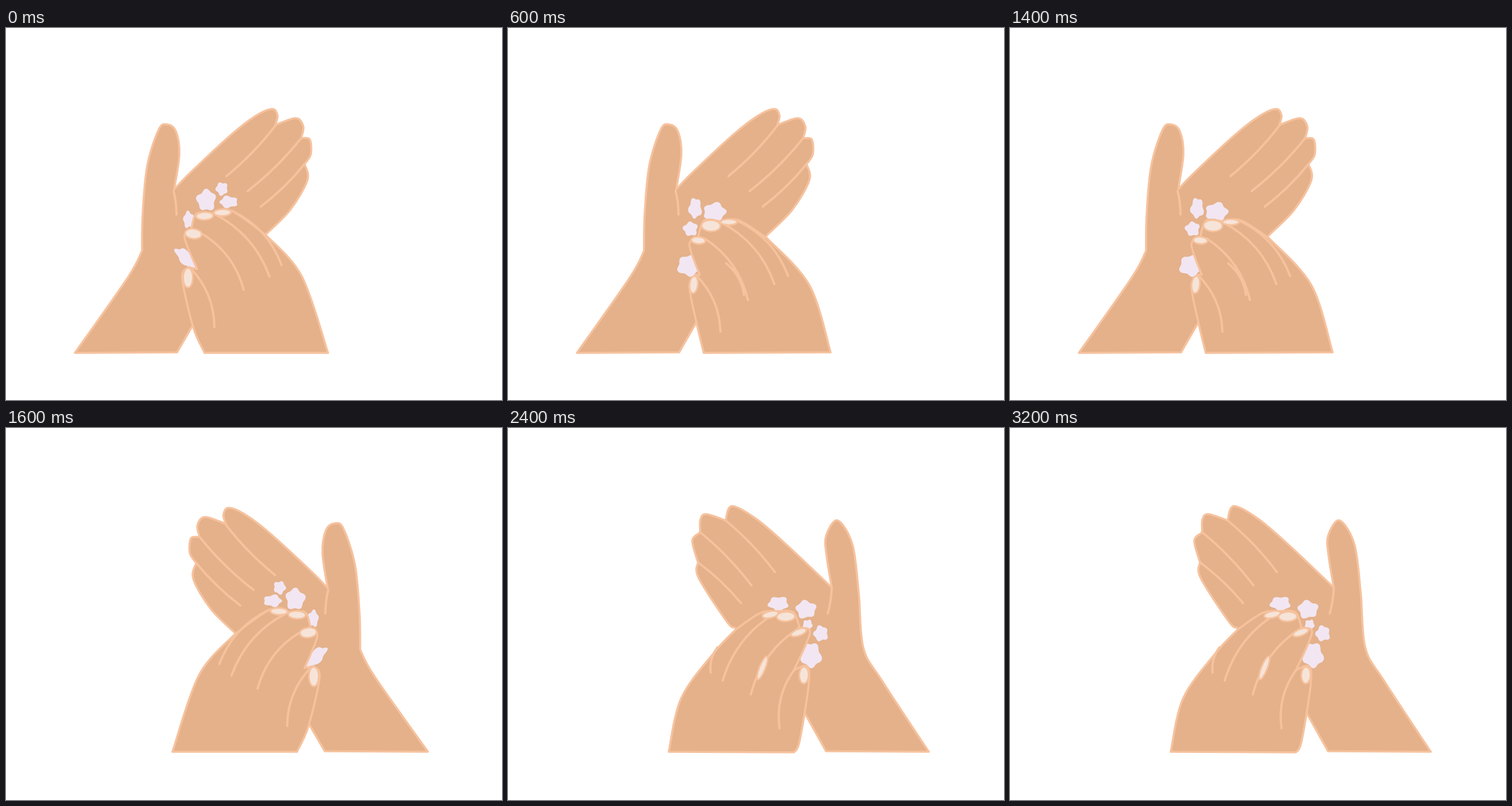
Recreate the animation shown at these times as an HTML page with a canvas. Size 864 by 648 pixels, loop 3.4 s.

```html
<!DOCTYPE html>
<html lang="en">
<head>
<meta charset="utf-8">
<title>Washing hands</title>
<style>
html, body { margin: 0; width: 100%; height: 100%; overflow: hidden; background: #fff; }
canvas { display: block; }
</style>
</head>
<body>
<canvas id="stage" width="864" height="648"></canvas>
<script>
const ctx = document.getElementById("stage").getContext("2d");
const SKIN = "#e4b18a", EDGE = "#f6c29e", NAIL = "#f6e4d9", FOAM = "#f2e6f2";
const STEP = 200;

const points = text => text.trim().split(/\s+/).map(p => p.split(",").map(Number));

// Closed outline through points; "/" marks a sharp corner.
function outline(text) {
  let last = null;
  ctx.beginPath();
  for (const run of text.split("/")) {
    const pts = points(run);
    if (last) pts.unshift(last);
    else ctx.moveTo(...pts[0]);
    const at = i => pts[Math.max(0, Math.min(pts.length - 1, i))];
    for (let i = 0; i < pts.length - 1; i++) {
      const [a, b, c, d] = [at(i - 1), at(i), at(i + 1), at(i + 2)];
      ctx.bezierCurveTo(
        b[0] + (c[0] - a[0]) / 6, b[1] + (c[1] - a[1]) / 6,
        c[0] - (d[0] - b[0]) / 6, c[1] - (d[1] - b[1]) / 6, ...c);
    }
    last = pts[pts.length - 1];
  }
  ctx.closePath();
}

function skin(text) {
  outline(text);
  ctx.fillStyle = SKIN;
  ctx.fill();
  ctx.lineWidth = 3.6;
  ctx.stroke();
}

// Finger lines, each from one point to the next, bowed sideways.
function rays(bend, text) {
  const pts = points(text);
  ctx.lineWidth = 4;
  ctx.beginPath();
  for (let i = 0; i < pts.length; i += 2) {
    const [[x, y], [u, v]] = [pts[i], pts[i + 1]];
    const k = 2 * bend;
    ctx.moveTo(x, y);
    ctx.quadraticCurveTo((x + u) / 2 + k * (v - y), (y + v) / 2 - k * (u - x), u, v);
  }
  ctx.stroke();
}

function nail(x, y, u, v, ratio = 0.3) {
  const len = Math.hypot(u - x, v - y);
  ctx.beginPath();
  ctx.ellipse((x + u) / 2, (y + v) / 2, len / 2, len * ratio, Math.atan2(v - y, u - x), 0, 2 * Math.PI);
  ctx.fillStyle = NAIL;
  ctx.fill();
  ctx.lineWidth = 2.8;
  ctx.stroke();
}

function foam(x, y, rx, ry, turn = 0) {
  ctx.beginPath();
  for (let a = 0; a < 2 * Math.PI; a += 0.1) {
    const r = 1 + 0.12 * Math.sin(5 * a + x) + 0.04 * Math.sin(3 * a + y);
    const px = rx * r * Math.cos(a), py = ry * r * Math.sin(a);
    ctx.lineTo(x + px * Math.cos(turn) - py * Math.sin(turn), y + px * Math.sin(turn) + py * Math.cos(turn));
  }
  ctx.fillStyle = FOAM;
  ctx.fill();
}

function leftPalm() {
  skin("120,566 212,435 237,388 / 238,325 246,240 266,177 281,168 296,180 302,220 293,281 / 320,253 392,186 435,153 464,141 473,153 469,169 / 505,157 518,172 514,192 / 529,194 531,220 520,237 / 525,265 495,317 452,360 / 343,487 / 298,565 / 120,566");
  rays(0.03, "292,284 297,325 470,169 384,258 514,192 421,284 520,237 444,311");
}

function rightPalm() {
  skin("736,566 655,443 622,385 614,290 603,205 577,163 557,190 558,225 567,280 / 490,207 435,160 393,138 382,163 / 348,152 338,162 338,184 / 324,198 334,236 / 335,263 384,339 398,350 / 514,488 / 557,565 / 736,566");
  rays(0.03, "567,280 560,325 382,163 468,253 337,183 427,276 334,236 409,307");
}

function rest() {
  leftPalm();
  foam(349, 300, 16, 18);
  foam(376, 280, 10, 11);
  foam(388, 303, 15, 10);
  foam(318, 334, 9, 14);
  foam(314, 401, 23, 11, 0.75);
  skin("346,566 / 326,521 307,436 318,417 / 333,420 / 311,365 323,349 / 332,323 361,323 / 392,318 452,360 / 515,432 561,566 / 346,566");
  rays(0.1, "320,417 363,521 341,358 414,456 361,323 459,433 395,319 480,413");
  nail(317, 418, 317, 452, 0.25);
  nail(312, 357, 341, 360);
  nail(331, 328, 361, 327, 0.23);
  nail(362, 322, 392, 321, 0.2);
}

function up() {
  leftPalm();
  foam(317, 290, 9, 12);
  foam(364, 280, 7, 6);
  foam(311, 383, 11, 13);
  skin("370,564 / 330,514 / 314,428 322,391 / 301,315 324,299 / 336,279 357,281 / 390,281 403,292 / 432,298 470,346 / 530,458 560,565 / 370,564");
  rays(0.05, "322,391 360,491 328,302 400,416 357,282 439,403 403,292 470,391");
  nail(320, 392, 319, 430, 0.2);
  nail(303, 305, 328, 319, 0.4);
  nail(329, 288, 356, 288, 0.42);
  nail(372, 284, 402, 293, 0.25);
  nail(411, 294, 433, 306, 0.22);
}

function out() {
  leftPalm();
  foam(342, 290, 13, 13);
  foam(373, 285, 18, 14);
  foam(337, 314, 7, 5);
  foam(318, 337, 12, 14);
  foam(320, 384, 14, 22);
  skin("378,565 / 348,522 330,430 343,400 / 350,402 / 329,350 345,334 / 358,308 382,309 / 412,305 471,346 / 540,425 584,563 / 378,565");
  rays(0.1, "343,400 379,505 357,342 429,445 384,311 479,422 412,306 500,402 395,380 425,437");
  nail(338, 400, 337, 434, 0.18);
  nail(333, 340, 358, 341);
  nail(349, 316, 386, 314, 0.25);
  nail(380, 308, 413, 308, 0.15);
}

function down() {
  leftPalm();
  foam(326, 314, 11, 17);
  foam(360, 320, 19, 15);
  foam(318, 350, 12, 12);
  foam(315, 414, 19, 18);
  skin("341,566 / 328,512 316,450 327,430 / 334,430 / 316,378 331,365 / 342,335 370,337 / 402,335 451,366 / 525,448 562,565 / 341,566");
  rays(0.1, "327,430 370,529 343,367 418,474 370,338 464,446 400,336 488,432 380,410 411,465");
  nail(325, 432, 322, 462, 0.24);
  nail(319, 369, 344, 371, 0.25);
  nail(337, 344, 370, 345);
  nail(370, 338, 399, 338, 0.18);
}

function upRight() {
  rightPalm();
  skin("285,566 / 325,440 384,339 / 415,290 447,282 / 470,268 490,273 / 515,267 528,290 / 550,292 525,378 / 541,390 519,500 / 500,535 476,566 / 285,566");
  rays(-0.03, "447,282 381,386 490,273 415,392 528,290 457,405 525,378 493,478 752,466 753,466");
  nail(421, 297, 445, 284, 0.25);
  nail(453, 286, 484, 271, 0.27);
  nail(505, 291, 521, 269, 0.4);
  nail(525, 303, 549, 298, 0.45);
  nail(534, 380, 533, 415, 0.18);
}

function downRight() {
  ctx.save();
  ctx.translate(-3, -2);
  rightPalm();
  ctx.restore();
  foam(471, 306, 17, 12);
  foam(519, 316, 17, 15);
  foam(522, 343, 8, 9);
  foam(545, 358, 12, 13);
  foam(528, 396, 17, 21);
  skin("280,564 / 302,470 360,390 398,350 / 440,322 470,319 / 497,321 508,348 / 526,357 498,422 / 520,415 524,445 508,545 498,565 / 280,564");
  rays(-0.1, "365,382 353,426 470,320 374,440 508,348 423,464 498,422 473,523");
  nail(443, 328, 471, 322, 0.2);
  nail(468, 329, 500, 328, 0.26);
  nail(493, 361, 520, 351, 0.2);
  nail(516, 416, 515, 445, 0.28);
  nail(435, 438, 451, 398, 0.12);
}

const mirror = (draw, x, y, sx = 1, sy = 1) => () => {
  ctx.transform(-sx, 0, 0, sy, x, y);
  draw();
};

const restRight = mirror(rest, 854, -3, 1.009);
const outRight = mirror(out, 861.7, -6, 1.015, 1.009);
const left = [rest, up, out, down];
const right = [upRight, outRight, downRight];
const steps = [...left, ...left, mirror(rest, 856, -2, 1.009), restRight, ...right, restRight, ...right];

const start = performance.now();

function frame() {
  const now = performance.now() - start;
  ctx.setTransform(1, 0, 0, 1, 0, 0);
  ctx.fillStyle = "#fff";
  ctx.fillRect(0, 0, 864, 648);
  ctx.strokeStyle = EDGE;
  ctx.lineCap = ctx.lineJoin = "round";
  steps[Math.floor(now / STEP) % steps.length]();
  requestAnimationFrame(frame);
}

frame();
</script>
</body>
</html>
```
